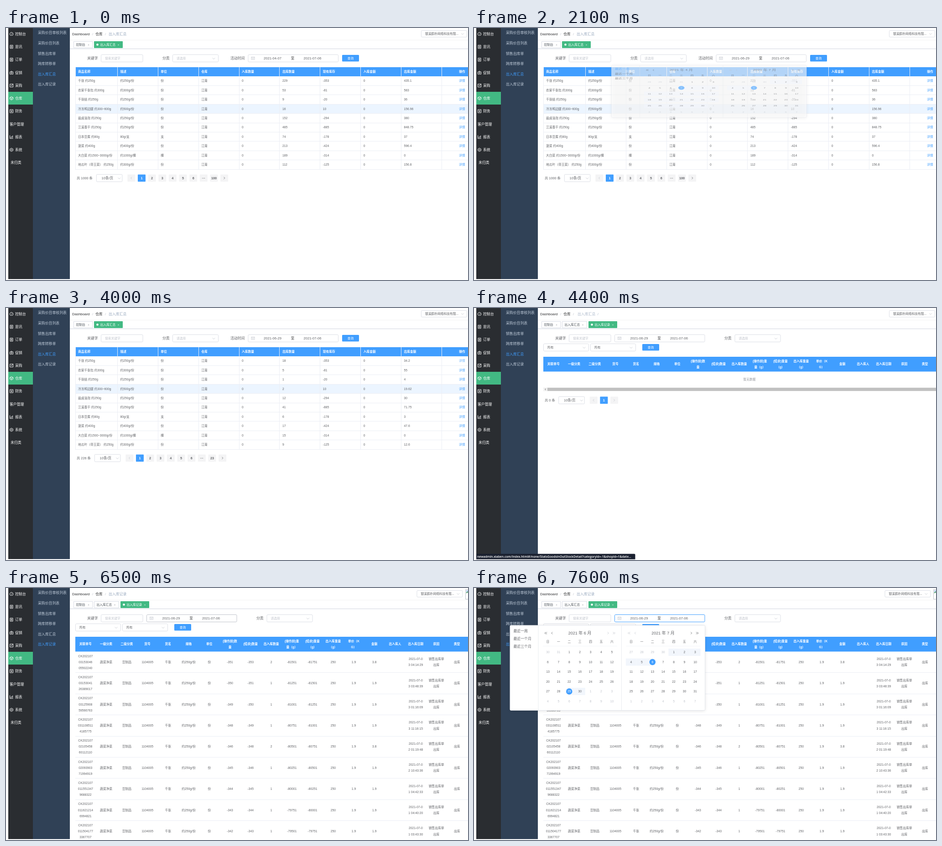
An HTML page with a canvas that plays this animation: 1013x553 px, repeating every 8000 ms.

```html
<!DOCTYPE html>
<html lang="zh-CN">
<head>
<meta charset="utf-8">
<title>出入库汇总</title>
<style>
html, body { margin: 0; width: 100%; height: 100%; overflow: hidden; background: #fff; }
canvas { display: block; }
</style>
</head>
<body>
<canvas id="stage" width="1013" height="553"></canvas>
<script>
const ctx = document.getElementById('stage').getContext('2d');
const FONT = '"Liberation Sans", "Noto Sans CJK SC", "Noto Sans CJK", sans-serif';
const BLUE = '#409eff', GREEN = '#42b983', TEXT = '#606266', PALE = '#c0c4cc',
  BORDER = '#dcdfe6', RULE = '#ebeef5', SMALL = 6.75, BASE = 7.875;

// ---- drawing helpers (y is the vertical middle of text) ----
function text(s, x, y, { size = SMALL, color = TEXT, align = 'left', weight = 400, font = FONT } = {}) {
  ctx.font = `${weight} ${size}px ${font}`;
  ctx.fillStyle = color;
  ctx.textAlign = align;
  ctx.fillText(s, x, y + size * .37);
}
const mid = (s, x, y, style) => text(s, x, y, { align: 'center', ...style });

function lines(s, x, y, gap, style) {
  const parts = String(s).split('|');
  parts.forEach((p, i) => mid(p, x, y + (i - (parts.length - 1) / 2) * gap, style));
}
function rect(x, y, w, h, color) {
  ctx.fillStyle = color;
  ctx.fillRect(x, y, w, h);
}
function box(x, y, w, h, fill, stroke, r = 2) {
  ctx.beginPath();
  ctx.roundRect(x, y, w, h, r);
  if (fill) { ctx.fillStyle = fill; ctx.fill(); }
  if (stroke) { ctx.strokeStyle = stroke; ctx.lineWidth = 1; ctx.stroke(); }
}
function disc(x, y, r, color) {
  ctx.fillStyle = color;
  ctx.beginPath();
  ctx.arc(x, y, r, 0, 7);
  ctx.fill();
}
function line(color, width, ...p) {
  ctx.strokeStyle = color;
  ctx.lineWidth = width;
  ctx.beginPath();
  for (let i = 0; i < p.length; i += 2) ctx.lineTo(p[i], p[i + 1]);
  ctx.stroke();
}
const down = (x, y) => line(PALE, .8, x - 2.8, y - 1.4, x, y + 1.4, x + 2.8, y - 1.4);
const side = (x, y, dir, color) =>
  line(color, .8, x - dir * 1.2, y - 2.4, x + dir * 1.2, y, x - dir * 1.2, y + 2.4);

// ---- widgets ----
function select(x, y, w, h, label, color, border = BORDER, pad = 8.5) {
  box(x, y, w, h, '#fff', border);
  text(label, x + pad, y + h / 2, { color });
  down(x + w - 10, y + h / 2 + .5);
}
function button(x, y, color) {
  box(x, y, 37, 14.5, color, null, 1.5);
  mid('查询', x + 18.5, y + 7.3, { color: '#fff' });
}
function dateField(x, from, { border = BORDER, clear, caret }) {
  box(x, 58.5, 197.5, 16, '#fff', border);
  ctx.strokeStyle = PALE;
  ctx.lineWidth = .7;
  ctx.strokeRect(x + 7, 63.5, 7, 6);
  line(PALE, .7, x + 7, 65.5, x + 14, 65.5);
  line(PALE, .7, x + 8.5, 67.5, x + 12.5, 67.5);
  mid(from, x + 53.5, 66.5, { size: 7.6 });
  mid('至', x + 97.5, 66.5, { size: 7.6, color: '#303133' });
  mid('2021-07-06', x + 141, 66.5, { size: 7.6 });
  if (caret) rect(x + 53, 62, .8, 9, '#303133');
  if (clear) {
    ctx.strokeStyle = PALE;
    ctx.lineWidth = .7;
    ctx.beginPath();
    ctx.arc(x + 184.5, 66.3, 3.3, 0, 7);
    ctx.stroke();
    line(PALE, .7, x + 183.2, 65, x + 185.8, 67.6);
    line(PALE, .7, x + 185.8, 65, x + 183.2, 67.6);
  }
}
function pager(y, total, x, labels) {
  text(`共 ${total} 条`, 155, y, { size: 7.3 });
  box(x, y - 8, 56.5, 16, '#fff', BORDER, 1.5);
  mid('10条/页', x + 24, y, { size: 7.5 });
  down(x + 50, y + .5);
  labels.forEach((label, i) => {
    const cx = x + 76.5 + i * 22.65, active = label === 1;
    box(cx - 8.5, y - 7.8, 17, 15.7, active ? BLUE : '#f4f4f5', null, 1);
    if (label === '<') side(cx, y, -1, PALE);
    else if (label === '>') side(cx, y, 1, labels.length > 3 ? TEXT : PALE);
    else mid(label, cx, y, { size: 7.3, weight: 700, color: active ? '#fff' : TEXT });
  });
}
function calendar(x, cols, month, from, to, onLeft) {
  const heads = [[-4.5, -1, 2], [9, -1, 1], [132, 1, 1], [145, 1, 2]];
  heads.forEach(([dx, dir, n], i) => {
    const color = (i > 1) === onLeft ? PALE : TEXT;
    for (let k = 0; k < n; k++) side(cols + dx + (n > 1 ? k * 2.6 - 1.3 : 0), 17, dir, color);
  });
  mid(`2021 年 ${month + 1} 月`, cols + 70, 17, { size: 9 });
  [...'日一二三四五六'].forEach((d, i) => mid(d, cols + i * 23.4, 36));
  line(RULE, .6, cols - 11, 45.5, cols + 152, 45.5);
  const lead = new Date(2021, month, 1).getDay();
  for (let i = 0; i < 42; i++) {
    const day = new Date(2021, month, 1 - lead + i), cx = cols + i % 7 * 23.4, cy = 59 + Math.floor(i / 7) * 21.5;
    const inside = day.getMonth() === month, first = +day === +from, last = +day === +to;
    if (inside && day >= from && day <= to) {
      const l = first ? 8 : 11.7, r = last ? 8 : 11.7;
      box(cx - l, cy - 8, l + r, 16, '#f2f6fc', null, [first ? 8 : 0, last ? 8 : 0, last ? 8 : 0, first ? 8 : 0]);
    }
    const picked = inside && (first || last);
    if (picked) disc(cx, cy, 6.75, BLUE);
    mid(day.getDate(), cx, cy, { color: picked ? '#fff' : inside ? TEXT : PALE });
  }
}
function popup(x, month, from, grow, hover) {
  if (grow <= 0) return;
  const to = new Date(2021, 6, 6);
  ctx.save();
  ctx.translate(x, 82);
  ctx.scale(1, grow);
  ctx.globalAlpha = grow;
  ctx.shadowColor = 'rgba(0,0,0,.12)';
  ctx.shadowBlur = 7;
  ctx.shadowOffsetY = 1;
  box(0, 0, 427.5, 186.5, '#fff', null);
  ctx.shadowColor = 'transparent';
  box(0, 0, 427.5, 186.5, null, '#e4e7ed');
  line('#e4e7ed', .8, 62, 0, 62, 186);
  line('#e4e7ed', .8, 244.5, 0, 244.5, 186);
  ['最近一周', '最近一个月', '最近三个月'].forEach((s, i) =>
    text(s, 7.5, 12 + i * 17, { size: BASE, color: hover && !i ? BLUE : TEXT }));
  calendar(x, 83, month, from, to, true);
  calendar(x, 265.5, 6, from, to, false);
  ctx.restore();
}

// ---- shell ----
const GAUGE = 'M1.5 7A3.7 3.7 0 1 1 6.5 7ZM4 5L5.5 2.8',
  DOC = 'M1 .5H7V7.5H1ZM2.5 2.5H5.5M2.5 4H5.5M2.5 5.5H5.5';
const MENU = [
  ['控制台', GAUGE], ['思讯', DOC], ['订单', DOC],
  ['促销', 'M.5 2.5H7.5V7.5H.5ZM2.5 2.5L4 .5L5.5 2.5M4 3.5V6.5M2.5 5H5.5'],
  ['采购', 'M.5 1H7.5V7.5H.5ZM2 3L4 5L7.5 .5'],
  ['仓库', 'M4 .3L7.5 2.2V5.8L4 7.7L.5 5.8V2.2ZM.5 2.2L4 4L7.5 2.2M4 4V7.7'],
  ['财务', 'M.5 .5H7.5V7.5H.5ZM2.5 2L4 3.8L5.5 2M4 3.8V6.5M2.5 4.5H5.5'],
  ['客户管理', '', 8],
  ['报表', 'M.5 .5V7.5H7.5M2.5 6V4M4.5 6V2.5M6.5 6V1'],
  ['系统', 'M4 .3L7.3 2.2V5.8L4 7.7L.7 5.8V2.2ZM4 2.7A1.3 1.3 0 1 0 4.01 2.7'],
  ['未归类', '', 10]
].map(([name, path, x = 20]) => ({ name, icon: new Path2D(path), x }));
const SUBMENU = ['采购价目审核列表', '采购价目列表', '销售出库单', '跨库转移单', '出入库汇总', '出入库记录'];

function sidebars(active) {
  rect(5, 0, 54, 551, '#2a2d31');
  rect(59, 0, 81, 551, '#304156');
  rect(5, 140, 54, 28, GREEN);
  MENU.forEach(({ name, icon, x }, i) => {
    const y = 13 + i * 28.25;
    text(name, x, y, { size: BASE, color: '#fff' });
    ctx.save();
    ctx.translate(8, y - 4);
    ctx.strokeStyle = '#fff';
    ctx.lineWidth = .9;
    ctx.stroke(icon);
    ctx.restore();
  });
  SUBMENU.forEach((s, i) =>
    text(s, 70, 10.5 + i * 22.6, { size: BASE, color: i === active ? BLUE : '#bfcbd9' }));
}
function crumb(s, x, alpha) {
  if (alpha <= 0) return;
  ctx.globalAlpha = Math.min(1, alpha);
  text(s, x, 13, { size: BASE, color: '#97a8be' });
  ctx.globalAlpha = 1;
}
function tab(x, w, label, active) {
  box(x, 29.5, w, 14, active ? GREEN : '#fff', active ? GREEN : '#d8dce5', 0);
  if (active) disc(x + 7, 36.5, 2.3, '#fff');
  const color = active ? '#fff' : '#495057';
  text(label, x + (active ? 13 : 5), 36.7, { color });
  mid('×', x + w - 9, 36.7, { size: 6, color: active ? '#fff' : '#909399' });
}
function shell(q, second, loaded) {
  sidebars(loaded ? 5 : 4);
  text('Dashboard', 145, 13, { size: BASE, color: '#303133' });
  text('/', 189, 13, { size: BASE, color: PALE });
  text('仓库', 196, 13, { size: BASE, color: '#303133' });
  text('/', 217, 13, { size: BASE, color: PALE });
  const p = second ? (q - 4300) / 500 : 0;
  crumb('出入库汇总' + (second ? '  /' : ''), (q < 4500 ? 225 : 269) + 10 * p, 1 - p);
  if (q >= 4500) crumb('出入库记录', 225 + Math.max(0, 4800 - q) / 30, (q - 4400) / 400);

  const cx = loaded ? 901 : 910.5;
  box(cx, 5.5, 100, 14.5, '#fff', BORDER);
  text('银溪鹤朴网络科技有限...', cx + 8.5, 13);
  down(cx + 90.5, 13);
  if (loaded) {
    box(1007.5, 3.5, 20, 21, '#fff', PALE, 0);
    rect(1009, 5, 4, 6, '#b9d3f0');
    line('#4a9a4a', 1.5, 1009, 11, 1013, 8);
  }
  rect(140, 26, 873, .8, '#f0f0f0');
  rect(140, 45, 873, 1.2, '#d8dce5');
  tab(148.5, 41.5, '控制台');
  tab(193.5, second ? 54 : 62, '出入库汇总', !second);
  if (second) tab(251.5, 62, '出入库记录', true);
  text('关键字', 178, 66.5, { size: BASE, weight: 500 });
  box(208.5, 58.5, 91.5, 16, '#fff', BORDER);
  text('搜索关键字', 217, 66.5, { color: PALE });
}

// ---- summary page ----
const GOODS = [ // name, description, unit, sold, sold in a week, stock, price
  ['千张 约250g', '约250g/份', '份', 229, 18, -353, 1.9],
  ['农家千张包 约300g', '约300g/份', '份', 53, 5, -81, 11],
  ['千张结 约250g', '约250g/份', '份', 9, 1, -20, 4],
  ['冷冻鸭边腿 约300~600g', '约500g/份', '份', 16, 2, 10, 9.81],
  ['盐卤油泡 约250g', '约250g/份', '份', 152, 12, -294, 2.5],
  ['兰溪香干 约250g', '约250g/份', '份', 485, 41, -885, 1.75],
  ['日本豆腐 约80g', '80g/支', '支', 74, 6, -178, .5],
  ['菠菜 约400g', '约400g/份', '份', 213, 17, -424, 2.8],
  ['大白菜 约1500~3000g/份', '约1000g/棵', '棵', 189, 15, -314, 0],
  ['地瓜叶（帝王菜） 约250g', '约300g/份', '份', 112, 9, -125, 1.4]
];
const HEADS = ['商品名称', '描述', '单位', '仓库', '入库数量', '出库数量', '现有库存', '入库金额', '出库金额'];
const colX = i => i ? 244.5 + (i - 1) * 88.87 : 152;

function summary(q, on) {
  const week = q >= 3100, open = on(1200, 2100);
  text('分类', 343, 66.5, { size: BASE, weight: 500 });
  select(365.5, 58.5, 100, 16, '请选择', PALE);
  text('活动时间', 492, 66.5, { size: BASE, weight: 500 });
  dateField(531, q < 2100 ? '2021-04-07' : '2021-06-29', {
    border: open ? BLUE : on(400, 700) || on(900, 1200) ? PALE : BORDER,
    clear: on(400, 700) || on(900, 2100),
    caret: on(1200, 1700)
  });
  button(737, 59, on(2700, 2800) ? '#53a8ff' : on(2800, 3000) ? '#66b1ff' : on(3000, 3100) ? '#3a8ee6' : BLUE);

  rect(152, 86, 861, 20, BLUE);
  rect(152, 167.2, 861, 20.4, '#ecf5ff');
  const white = { color: '#fff', weight: 700 };
  HEADS.forEach((s, i) => text(s, colX(i) + 6, 96, white));
  mid('操作', 1000, 96, white);
  GOODS.forEach(([name, desc, unit, all, recent, stock, price], r) => {
    const y = 116 + r * 20.39, sold = week ? recent : all;
    [name, desc, unit, '江南', 0, sold, stock, 0, +(sold * price).toFixed(2)]
      .forEach((s, i) => text(s, colX(i) + 6, y));
    mid('详情', 1000, y, { color: !r && q >= 4000 ? '#66b1ff' : BLUE });
    rect(152, Math.round(y + 10), 861, 1, RULE);
  });
  for (let i = 0; i < 10; i++) rect(Math.floor(colX(i)), 86, 1, 224, RULE);
  const pages = ['<', 1, 2, 3, 4, 5, 6, '···', week ? 23 : 100, '>'];
  pager(329.3, week ? 226 : 1000, week ? 194.3 : 198.3, pages);
}

// ---- record page ----
const RECORD_HEADS = ['关联单号', '一级分类', '二级分类', '货号', '货名', '规格', '单位', '(操作前)数|量', '(结余)数量',
  '出入库数量', '(操作前)重|量（g）', '(结余)重量|（g）', '出入库重量|（g）', '单价（K|G）', '金额', '出入库人',
  '出入库日期', '原因', '类型'];
const RECORDS = [ // order tail, time, stock before, count
  ['03153046|05502240', '3 04:14:29', -351, 2], ['03153041|26389017', '3 03:48:39', -350, 1],
  ['03125908|59566763', '3 01:16:09', -349, 1], ['031108511|4185775', '3 11:16:15', -348, 1],
  ['02105458|60112110', '2 01:19:48', -346, 2], ['02093903|71994919', '2 10:43:36', -345, 1],
  ['011551347|9688322', '1 04:42:33', -344, 1], ['011621214|6994821', '1 04:40:20', -343, 1],
  ['011504177|3367707', '1 03:43:30', -342, 1]
];
const recordX = i => 174.3 + i * 45.25;

function records(q, on, loaded) {
  dateField(308.5, '2021-06-29', {
    border: q >= 7100 ? BLUE : on(5700, 6700) || on(6900, 7100) ? PALE : BORDER,
    clear: on(5700, 6500) || on(6700, 7600),
    caret: on(7100, 7600)
  });
  text('分类', 549, 66.5, { size: BASE, weight: 500 });
  select(572, 58.5, 100, 16, '请选择', PALE);
  select(152.5, 78.5, 99, 16, '所有', TEXT);
  select(255.5, 78.5, 99, 16, '所有', TEXT, on(5600, 5700) ? PALE : BORDER);
  button(369, 79, BLUE);

  rect(152, 107, 861, 32.5, BLUE);
  RECORD_HEADS.forEach((s, i) => lines(s, recordX(i), 123, 13, { color: '#fff', weight: 700 }));
  if (!loaded) {
    mid('暂无数据', 604, 157, { color: '#909399' });
    rect(152, 174.5, 861, 8, '#f1f1f1');
    rect(161, 175, 852, 7, '#c1c1c1');
    line('#606060', 1, 157.5, 176.8, 155.8, 178.5, 157.5, 180.2);
    pager(202.4, 0, 185.7, ['<', 1, '>']);
    return;
  }
  if (on(4900, 5600)) rect(152, 139.5, 861, 46, '#f5f7fa');
  RECORDS.forEach(([order, time, before, n], r) => {
    const y = 162.3 + r * 46.4, weight = -81501 + 250 * r;
    ['CK202107|' + order, '蔬菜净菜', '豆制品', '1104005', '千张', '约250g/份', '份', before, before - n, n,
      weight, weight - 250, 250, 1.9, 1.9 * n, '', '2021-07-0|' + time, '销售出库单|出库', '出库']
      .forEach((s, i) => lines(s, recordX(i), y, 13.1));
    rect(152, Math.round(y + 23), 861, 1, RULE);
  });
}

function status() {
  box(5, 539.5, 348.5, 12, '#1b2130', null, [0, 2, 0, 0]);
  text('newadmin.xiaben.com/Index.html#/none/StatsGoodsInOutStockDetail?categoryId=-1&shopId=1&date...',
    7, 545.7, { size: SMALL, color: '#fff', weight: 600, font: '"Open Sans", sans-serif' });
}

// ---- timeline ----
const LOOP = 8000;
const easeOut = (q, start) => 1 - (1 - Math.min(1, Math.max(0, (q - start) / 300))) ** 5;

function draw(now) {
  const q = Math.floor(now % LOOP / 100) * 100; // screen refreshes ten times a second
  const on = (a, b) => q >= a && q < b;
  const second = q >= 4300, loaded = q >= 4600;
  rect(0, 0, 1013, 553, '#fff');
  shell(q, second, loaded);
  if (second) records(q, on, loaded);
  else summary(q, on);
  if (on(1200, 2500))
    popup(301.5, 3, new Date(2021, 3, 7), easeOut(q, 1172) - easeOut(q, 2072), q >= 1600);
  if (q >= 7100) popup(79, 5, new Date(2021, 5, 29), easeOut(q, 7072), false);
  if (on(4200, 4700)) status();
  requestAnimationFrame(() => draw(performance.now()));
}
draw(0);
</script>
</body>
</html>
```
